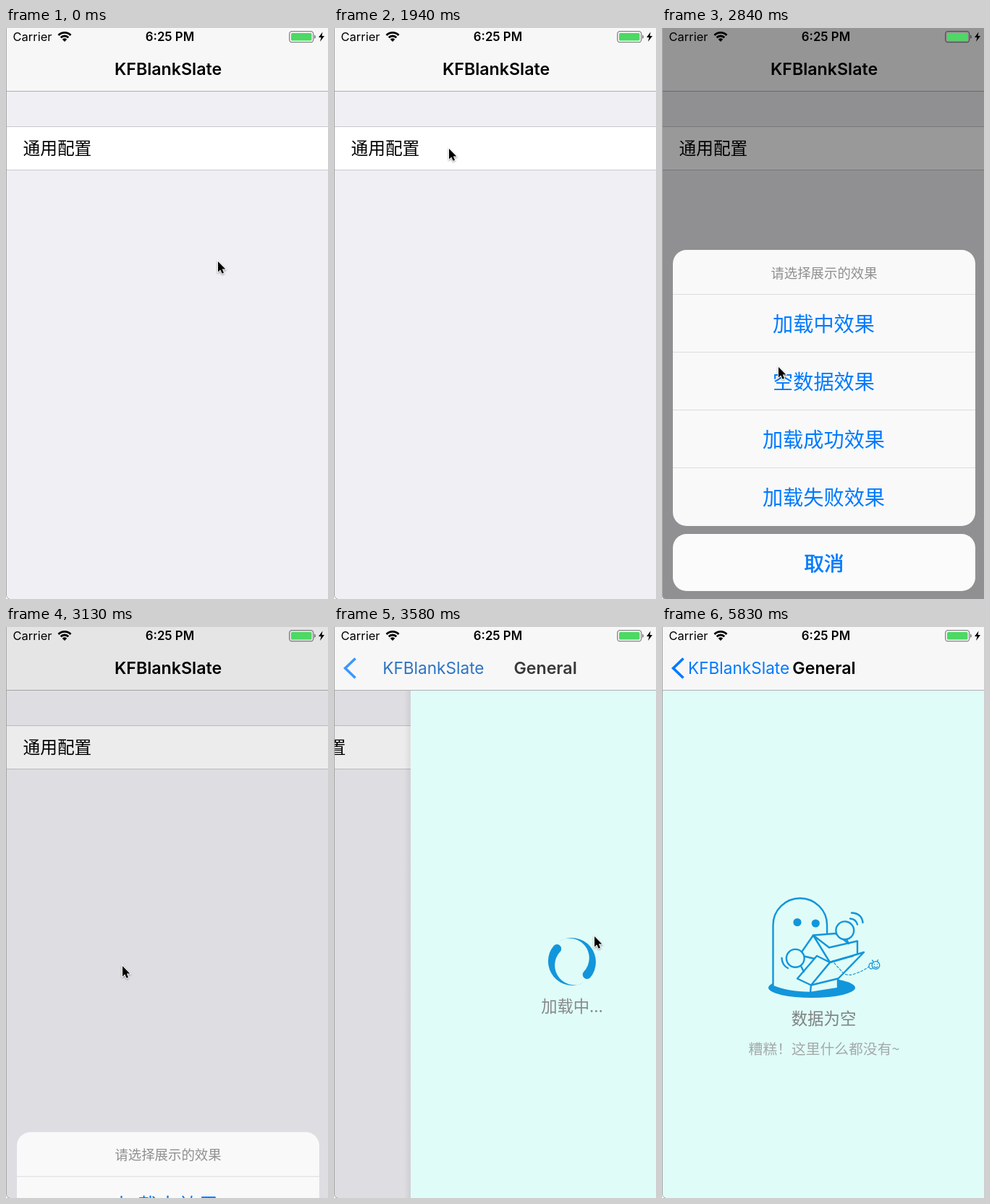
An HTML page that plays this animation: 445 px wide and 790 px high, repeating every 6730 ms.

```html
<!DOCTYPE html>
<html lang="zh">
<head>
<meta charset="utf-8">
<style>
html, body { margin: 0; width: 100%; height: 100%; overflow: hidden; background: #efeff4; }
svg { display: block; width: 445px; height: 790px; overflow: hidden; }
text { font-family: Inter, "Noto Sans CJK SC", "Noto Sans CJK", sans-serif; }
.cjk { font-family: "Noto Sans CJK SC", "Noto Sans CJK", sans-serif; }
.mid { text-anchor: middle; }
.bold { font-weight: 600; font-size: 23.2px; }
.plain { font-weight: 400; font-size: 22.6px; }
.art { stroke: #1296db; stroke-width: 2.4; fill: #e0fcf8; stroke-linejoin: round; stroke-linecap: round; }
.art .solid { fill: #1296db; stroke: none; }
.art .line { fill: none; }
#cursor { stroke: #fff; stroke-width: 1.8; paint-order: stroke; filter: drop-shadow(0 1px 1px #0006); }
</style>
</head>
<body>
<svg viewBox="0 0 445 790">
  <defs>
    <linearGradient id="shade"><stop offset="0" stop-opacity="0"/><stop offset="1" stop-opacity=".07"/></linearGradient>
    <path id="comma" d="M-25-22.3A33.5 33.5 0 0 0 18 28A27.2 27.2 0 0 1-16.6-13.4A6.1 6.1 0 0 0-25-22.3Z"/>
  </defs>

  <rect width="445" height="790" fill="#efeff4"/>
  <g id="list">
    <rect y="136.5" width="580" height="60" fill="#fff" stroke="#c8c7cc"/>
    <rect id="press" y="137" width="580" height="59"/>
    <text class="cjk" x="23.5" y="175" font-size="23.7">通用配置</text>
  </g>
  <rect id="listDim" width="445" height="790"/>

  <g id="page">
    <rect x="-9" width="9" height="790" fill="url(#shade)"/>
    <rect width="445" height="790" fill="#e0fcf8"/>
    <g id="loading">
      <g id="spinner" fill="#1296db"><use href="#comma"/><use href="#comma" transform="rotate(180)"/></g>
      <text class="cjk mid" x="223" y="533" font-size="22.3" fill="#858989">加载中...</text>
    </g>
    <g id="empty">
      <g class="art">
        <ellipse class="solid" cx="207" cy="499" rx="60" ry="14"/>
        <path d="M153.5 497V412.5a37.3 37.3 0 0 1 74.6 0V470L205 506Q172 505 153.5 497Z"/>
        <circle class="solid" cx="187" cy="408.5" r="5.6"/>
        <circle class="solid" cx="212.3" cy="410" r="5.6"/>
        <path d="M190 454L209 426.5L240 424L258 438L232 464Z"/>
        <path d="M209 426.5L232 464L270 453V434.5L231 443.5Z"/>
        <path d="M206 495L232 464L279 450L243 487V500L205 506Z"/>
        <path d="M187 486.5L214 455L232 464L206 495.5Z"/>
        <path class="line" d="M206 495.5L243 486.5M192 469L196 477M255 432L258 438M232 464L264 455"/>
        <circle cx="184.3" cy="458.3" r="12.4"/>
        <circle cx="252.8" cy="419.8" r="12.4"/>
        <path class="line" d="M165.5 458Q166 468 174 472M260 403.5Q268 404 270 411.5M262 395.5Q276 396 277.5 409"/>
        <path class="line" stroke-width="1.2" stroke-dasharray="3 2.5" d="M238 465L248 476Q254 484 266 480T286 470"/>
        <g stroke-width="1.3">
          <ellipse cx="289" cy="469" rx="3" ry="4"/>
          <circle cx="295.5" cy="468" r="5.3"/>
          <path class="line" d="M292 463L290.5 461M297.5 463L298.5 460.5M293 470Q295.5 472.5 298 470M293.5 466.5v.2M297.5 466.5v.2"/>
        </g>
      </g>
      <text class="cjk mid" x="223.5" y="550" font-size="22.4" fill="#7d8281">数据为空</text>
      <text class="cjk mid" x="224" y="590.5" font-size="19.8" fill="#a3aaa9">糟糕！这里什么都没有~</text>
    </g>
  </g>

  <rect width="445" height="87" fill="#f7f7f8"/>
  <rect y="87" width="445" height="1" fill="#b0b0b3"/>
  <path id="back" d="M29.5 43.5L15.5 57L29.5 70.5" fill="none" stroke="#007aff" stroke-width="3.6"/>
  <text id="label" y="65">KFBlankSlate</text>
  <text id="title" class="mid bold" y="65">General</text>

  <rect id="dim" width="445" height="790"/>
  <path d="M.5 0V784Q.5 789 5 790" fill="none" stroke="#a8a8ab"/>
  <path d="M0 785Q0 790 4 790H0Z" fill="#fff"/>
  <g id="sheet">
    <rect x="15" y="307" width="418" height="382" rx="19" fill="#f9f9f9"/>
    <rect x="15" y="700" width="418" height="79" rx="19" fill="#fbfbfb"/>
    <path d="M15 368.5h418m-418 80h418m-418 80h418m-418 80h418" stroke="#dcdcdf"/>
    <text class="cjk mid" x="224" y="345.5" font-size="18.4" fill="#8f8f8f">请选择展示的效果</text>
    <g class="mid" font-size="28.2" fill="#007aff">
      <text class="cjk" x="223.5" y="419.5">加载中效果</text>
      <text class="cjk" x="223.5" y="499.5">空数据效果</text>
      <text class="cjk" x="223.5" y="579.5">加载成功效果</text>
      <text class="cjk" x="223.5" y="659.5">加载失败效果</text>
      <text class="cjk" x="224" y="750.5" font-size="27.5" stroke="#007aff" stroke-width=".7">取消</text>
    </g>
  </g>

  <text x="9.5" y="18" font-size="16.5">Carrier</text>
  <text class="mid" x="226.5" y="18" font-size="16.8" font-weight="600">6:25 PM</text>
  <path d="M72.5 10A12 12 0 0 1 89.5 10M75.7 13.2A7.5 7.5 0 0 1 86.3 13.2" fill="none" stroke="#000" stroke-width="2.8"/>
  <path d="M81 19L77.8 15.7A4.5 4.5 0 0 1 84.2 15.7Z"/>
  <g opacity=".46">
    <rect x="391.7" y="4.7" width="33" height="15" rx="3.5" fill="none" stroke="#000" stroke-width="1.3"/>
    <path d="M426 9.5q2 .5 2 2.8t-2 2.8Z"/>
  </g>
  <rect x="394" y="7" width="28.5" height="10.5" rx="1.5" fill="#4cd964"/>
  <path d="M437.5 5.5L432 13h3.5L434 19l6-8h-3.5Z"/>

  <path id="cursor" d="M0 0V14.5L3.3 11.5L5.6 16.8L8 15.8L5.8 10.6H10.3Z"/>
</svg>
<script>
const LOOP = 6730, STEP = LOOP / 45;
const $ = id => document.getElementById(id);
const set = (id, name, value) => $(id).setAttribute(name, value);
const move = (id, x, y) => set(id, 'transform', `translate(${x} ${y})`);

// step, x, y of the pointer tip
const path = [
  [0, 293, 323], [5, 159, 167], [13, 159, 167], [15, 158, 248],
  [19, 161, 469], [21, 161, 469], [24, 360, 428], [28, 446, 410],
  [29, 446, 900], [34, 430, 900], [35, 411, 459], [38, 362, 704],
  [39, 346, 800], [45, 346, 800]
];

// critically damped spring from 0 to 1
function spring(n, start, rate) {
  const a = Math.max(0, n - start) * rate;
  return 1 - (1 + a) * Math.exp(-a);
}

function pointer(n) {
  const i = path.findIndex(k => k[0] > n);
  const a = path[i - 1], b = path[i], f = (n - a[0]) / (b[0] - a[0]);
  return [a[1] + (b[1] - a[1]) * f, a[2] + (b[2] - a[2]) * f];
}

function draw(ms) {
  const n = Math.min(44, Math.floor((ms % LOOP) / STEP + 0.08));
  const shown = n < 20 ? spring(n, 13, 2.8) : 1 - spring(n, 20, 3.07);
  const p = spring(n, 23, 2.76), rest = 1 - p;

  move('list', -0.3 * 445 * p, 0);
  set('press', 'opacity', n > 13 ? Math.max(0, 16 - n) * 0.075 : 0);
  set('listDim', 'opacity', 0.1 * p);
  move('page', p ? 445 * rest : 460, 0);
  set('loading', 'visibility', n < 30 ? 'visible' : 'hidden');
  set('empty', 'visibility', n < 30 ? 'hidden' : 'visible');
  set('spinner', 'transform', `translate(223 463) rotate(${(n - 24) * 54})`);

  set('back', 'opacity', p);
  set('label', 'x', 36 + 114 * rest ** 0.9);
  set('label', 'class', p < 0.4 ? 'bold' : 'plain');
  set('label', 'fill', `rgb(${248 * rest * p}, ${(248 - 126 * p) * p}, ${254 * p})`);
  set('title', 'x', 224 + 286 * rest);
  set('title', 'opacity', p);

  set('dim', 'opacity', 0.4 * shown);
  move('sheet', 0, 483 * (1 - shown));
  move('cursor', ...pointer(n));
}

const begin = performance.now();
function tick() {
  draw(performance.now() - begin);
  requestAnimationFrame(tick);
}
tick();
</script>
</body>
</html>
```
